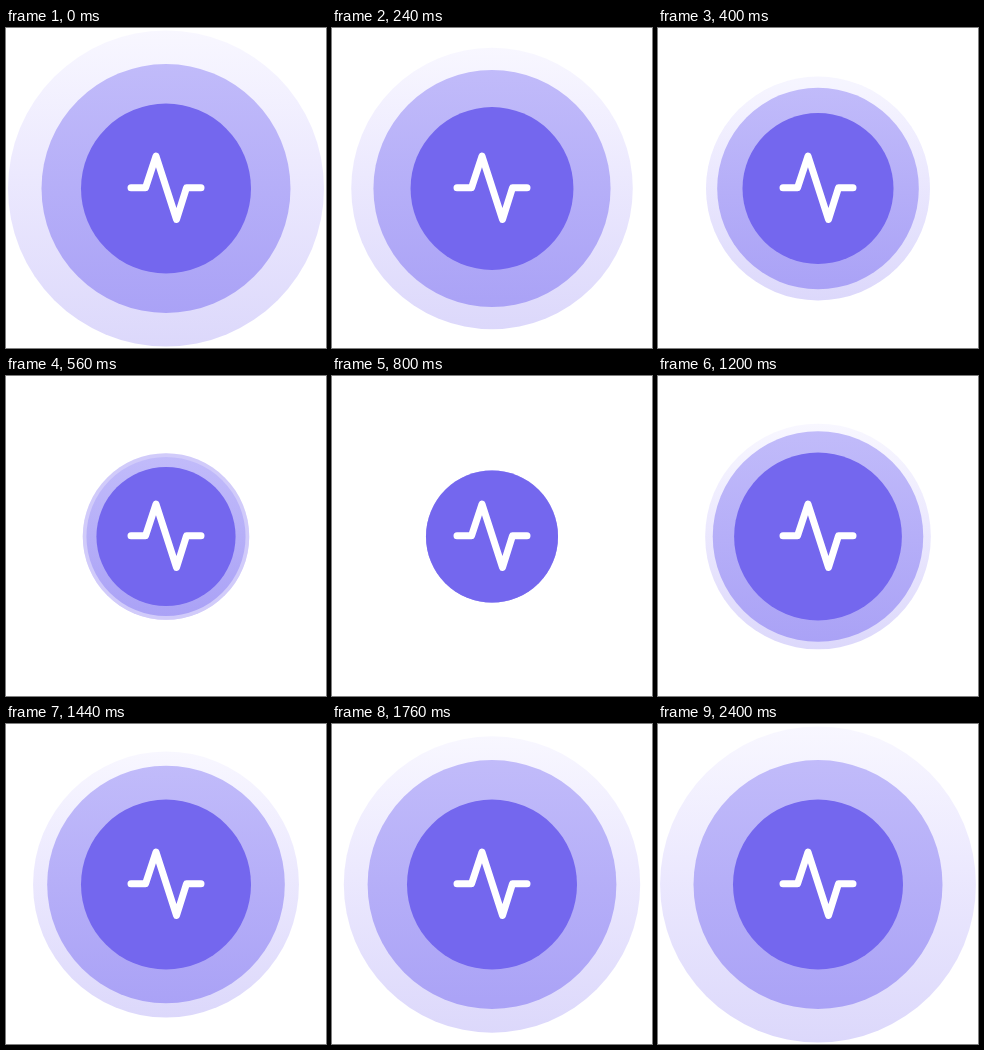
An HTML page that plays this animation: 320x320 px, repeating every 2480 ms.

```html
<!DOCTYPE html>
<html lang="en">
<head>
<meta charset="utf-8">
<title>Pulse</title>
<style>
  html, body { margin: 0; width: 100%; height: 100%; overflow: hidden; background: #fff; }
  svg { display: block; width: 100vw; height: 100vh; }
</style>
</head>
<body>
<svg viewBox="0 0 320 320">
  <defs>
    <linearGradient id="pale" x2="0" y2="1">
      <stop stop-color="#f8f7ff"/><stop offset=".45" stop-color="#ece9fe"/><stop offset="1" stop-color="#dcd8fb"/>
    </linearGradient>
    <linearGradient id="soft" x2="0" y2="1">
      <stop stop-color="#c1bbfa"/><stop offset="1" stop-color="#aaa2f6"/>
    </linearGradient>
  </defs>
  <g id="rings">
    <circle cx="160" cy="160.5" fill="url(#pale)"/>
    <circle id="tint" cx="160" cy="160.5" fill="#d1cbfa"/>
    <circle cx="160" cy="160.5" fill="url(#soft)"/>
    <circle cx="160" cy="160.5" fill="#7467ee"/>
  </g>
  <path d="M125 159.8H139.5L150 128L170.5 191.5L180.5 159.8H195" fill="none" stroke="#fff"
    stroke-width="7" stroke-linecap="round" stroke-linejoin="round"/>
</svg>
<script>
const LOOP = 2480, STEP = 80, TURN = 800, MIN = 66;
const [outer, tint, middle, inner] = document.querySelectorAll('#rings circle');
const clamp = x => Math.min(1, Math.max(0, x));

function bezier(x1, y1, x2, y2) {
  const at = (a, b, s) => 3 * a * s * (1 - s) ** 2 + 3 * b * s * s * (1 - s) + s ** 3;
  return x => {
    let lo = 0, hi = 1;
    for (let i = 0; i < 24; i++) {
      const mid = (lo + hi) / 2;
      if (at(x1, x2, mid) < x) lo = mid; else hi = mid;
    }
    return at(y1, y2, lo);
  };
}

const easeInOut = bezier(.42, 0, .58, 1);
const ease = bezier(.25, .1, .25, 1);
const easeOut = bezier(.22, .42, .32, 1);

// Shrink until TURN, then grow back over `growth` ms.
function radius(t, max, delay, growth, growEase) {
  const size = t < TURN
    ? 1 - easeInOut(clamp((t - delay) / (TURN - delay)))
    : growEase(clamp((t - TURN) / growth));
  return MIN + (max - MIN) * size;
}

function draw(now) {
  const t = Math.floor(now % LOOP / STEP) * STEP;
  const r = radius(t, 158, 0, 1680, easeOut);
  outer.setAttribute('r', r);
  tint.setAttribute('r', r);
  tint.setAttribute('opacity', clamp((113 - r) / 20));
  middle.setAttribute('r', radius(t, 124.5, 80, 1020, ease));
  inner.setAttribute('r', radius(t, 85, 0, 570, ease));
}

const start = performance.now();
function tick() {
  draw(performance.now() - start);
  requestAnimationFrame(tick);
}
tick();
</script>
</body>
</html>
```
